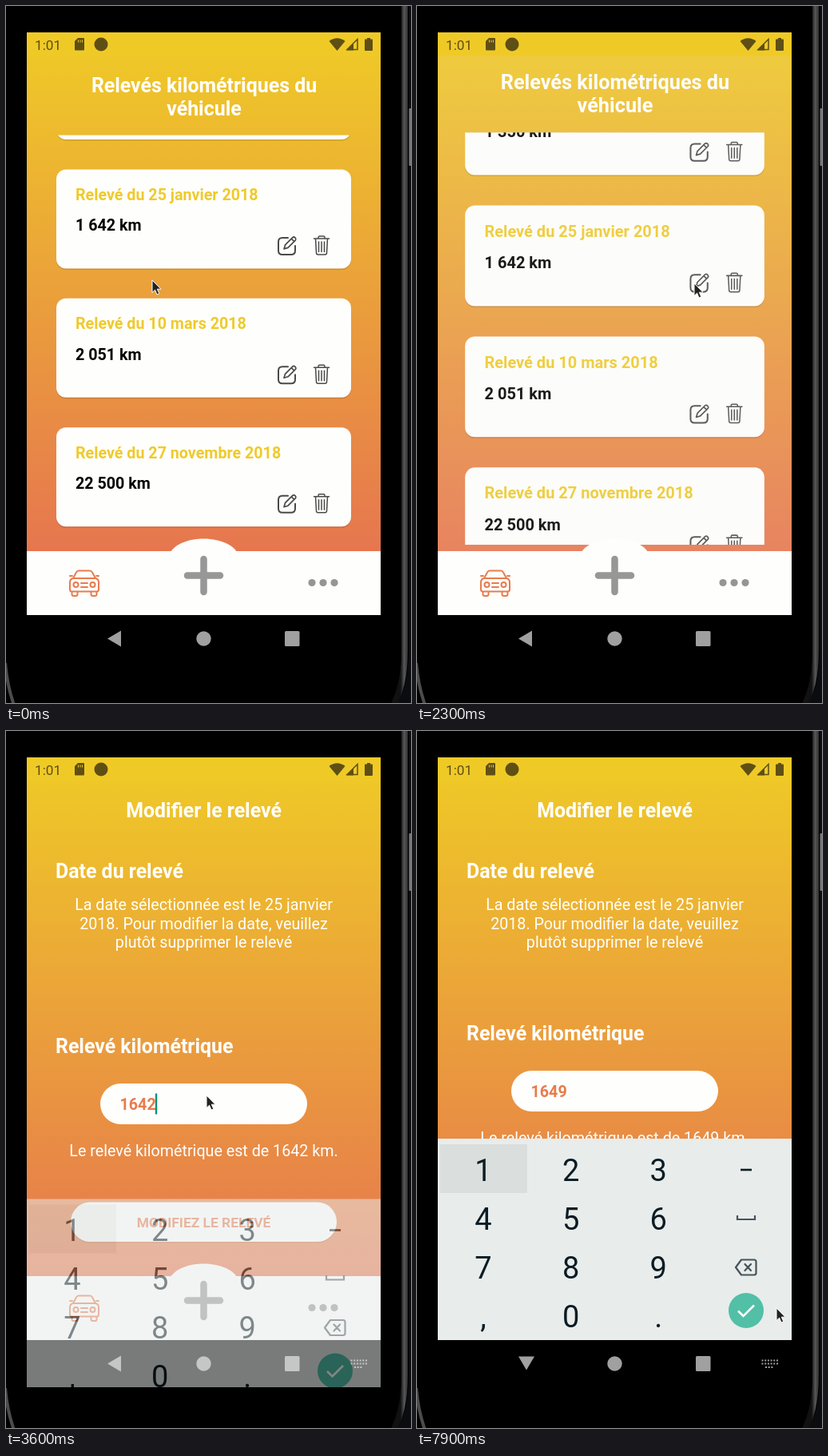
Recreate the animation shown at these times as an HTML page. Size 507x872 px, loop 8000 ms.

```html
<!DOCTYPE html>
<html lang="fr">
<head>
<meta charset="utf-8">
<title>Relevés kilométriques</title>
<style>
  html, body { margin: 0; width: 100%; height: 100%; overflow: hidden; background: #000; }
  svg { display: block; width: 100%; height: 100%; }
  text { font-family: Roboto, "Open Sans", sans-serif; font-size: 19.7px; }
  .h { font-size: 24.9px; font-weight: 700; fill: #fff; }
  .b { font-weight: 700; }
  .mid { text-anchor: middle; }
  .key { font-size: 38px; fill: #0b1c24; text-anchor: middle; }
  .line { fill: none; stroke-linecap: round; stroke-linejoin: round; }
</style>
</head>
<body>
<svg viewBox="0 0 507 872" xmlns="http://www.w3.org/2000/svg">
  <defs>
    <linearGradient id="sky" gradientUnits="userSpaceOnUse" x1="0" y1="33" x2="0" y2="682">
      <stop offset="0" stop-color="#efcb26"/>
      <stop offset="1" stop-color="#e6764f"/>
    </linearGradient>
    <linearGradient id="metal" gradientUnits="userSpaceOnUse" x1="494" y1="0" x2="504" y2="0">
      <stop offset="0" stop-color="#111"/>
      <stop offset=".45" stop-color="#565656"/>
      <stop offset="1" stop-color="#2a2a2a"/>
    </linearGradient>
    <clipPath id="appClip"><rect x="26" y="62" width="443" height="620"/></clipPath>
    <clipPath id="listClip"><rect x="50" y="161.5" width="395" height="508"/></clipPath>
    <clipPath id="screenClip"><rect x="26" y="33" width="443" height="788"/></clipPath>
    <g id="edit" class="line" stroke="#4a4a4a" stroke-width="2">
      <path d="M13 2H6Q1 2 1 7V18Q1 23 6 23H17Q22 23 22 18V12"/>
      <path d="M8 16L9.5 11 19 1.5Q20.5 .5 22 2 23.500 3.500 22.500 5L13 14.500ZM17.500 3.500L20.500 6.500" stroke-width="1.700"/>
    </g>
    <g id="trash" class="line" stroke="#4a4a4a" stroke-width="1.500">
      <path d="M.5 4H19.500M6 4V2.500Q6 1 7.500 1H12.500Q14 1 14 2.500V4M2.500 4L3.500 22Q3.600 24 5.500 24H14.500Q16.400 24 16.500 22L17.500 4"/>
      <path d="M6.500 8V20.500M10 8V20.500M13.500 8V20.500"/>
    </g>
  </defs>

  <!-- phone body -->
  <rect width="507" height="872"/>
  <path d="M499 -5V805C499 840 493 860 483 880" fill="none" stroke="url(#metal)" stroke-width="8"/>
  <path d="M507 0V872H490C500 855 504 835 504 805V0Z" fill="#0a0c10"/>
  <rect x="504.500" y="128" width="4" height="72" rx="1" fill="#777"/>
  <path d="M-1 822C1 846 5 862 12 880" fill="none" stroke="#4c4c4c" stroke-width="4"/>

  <!-- status bar -->
  <rect x="26" y="33" width="443" height="30" fill="#efca27"/>
  <g fill="#5f4f14">
    <text x="36" y="54.500" style="font-size:17.200px">1:01</text>
    <path d="M90 40H97Q98 40 98 41V54Q98 55.500 97 55.500H87Q86 55.500 86 54.500V44Z"/>
    <path d="M90.500 42.500V45.500M93 42.500V45.500M95.500 42.500V45.500" stroke="#efca27"/>
    <circle cx="119" cy="48" r="8.500"/>
    <path d="M404.500 44Q414.500 36.500 424.500 44L414.500 56Z"/>
    <path d="M427 54.500L440 41.500V54.500Z" fill="none" stroke="#5f4f14" stroke-width="1.500"/>
    <path d="M426 55.500L435 46.500V55.500Z"/>
    <path d="M449 42.500Q449 41.500 450 41.500H452V40H456V41.500H458Q459 41.500 459 42.500V55Q459 56 458 56H450Q449 56 449 55Z"/>
  </g>

  <!-- pages -->
  <g clip-path="url(#appClip)">
    <rect x="26" y="62" width="443" height="620" fill="#f2f2f2"/>
    <g id="listPage">
      <rect x="26" y="33" width="443" height="649" fill="url(#sky)"/>
      <text class="h mid" x="248" y="108">Relevés kilométriques du</text>
      <text class="h mid" x="248" y="137">véhicule</text>
      <g clip-path="url(#listClip)">
        <g id="cards"></g>
        <rect id="bar" x="427" width="5" height="320" fill="#555" opacity=".42"/>
      </g>
    </g>
    <g id="formPage">
      <rect x="26" y="33" width="443" height="649" fill="url(#sky)"/>
      <text class="h mid" x="247.500" y="108">Modifier le relevé</text>
      <text class="h" x="62" y="184">Date du relevé</text>
      <g class="mid" fill="#fff">
        <text x="247.500" y="224">La date sélectionnée est le 25 janvier</text>
        <text x="247.500" y="247.500">2018. Pour modifier la date, veuillez</text>
        <text x="247.500" y="271">plutôt supprimer le relevé</text>
      </g>
      <g id="field">
        <text class="h" x="62" y="403">Relevé kilométrique</text>
        <rect x="118" y="441" width="259" height="51" rx="25.500" fill="#fefefc"/>
        <text id="value" class="b" x="142.500" y="474" fill="#e77c4e"></text>
        <rect id="caret" y="453.500" width="2.400" height="26" fill="#0f8f77"/>
        <text id="label" class="mid" x="247.500" y="531.500" fill="#fff"></text>
        <rect x="81" y="591" width="333" height="49.500" rx="24.500" opacity=".12"/>
        <rect x="81" y="589.500" width="333" height="49.500" rx="24.500" fill="#fefefc"/>
        <text class="b mid" x="247.500" y="621" fill="#e77c4e" style="font-size:17.400px">MODIFIEZ LE RELEVÉ</text>
      </g>
    </g>
  </g>

  <!-- tab bar -->
  <g fill="#fefefc">
    <rect x="26" y="682" width="443" height="80"/>
    <path d="M206 683C220 661 275 661 289 683Z"/>
  </g>
  <path class="line" d="M227 712.500H268M247.500 692V733" stroke="#979797" stroke-width="8.500"/>
  <g fill="#959595">
    <circle cx="383" cy="721.500" r="4.600"/>
    <circle cx="397" cy="721.500" r="4.600"/>
    <circle cx="411" cy="721.500" r="4.600"/>
  </g>
  <g class="line" stroke="#e77c4e" stroke-width="2">
    <path d="M84 716L88 708.500Q89 706.500 91 706.500H105Q107 706.500 108 708.500L112 716"/>
    <path d="M84 716H112Q116 717 116 721V730Q116 732.500 113.500 732.500H82.500Q80 732.500 80 730V721Q80 717 84 716ZM80 713H83M113 713H116"/>
    <path d="M82.500 733V736Q82.500 738 84.500 738H87.500Q89.500 738 89.500 736V733M106.500 733V736Q106.500 738 108.500 738H111.500Q113.500 738 113.500 736V733M94 722H102M94 727H102"/>
    <circle cx="87.500" cy="724" r="3"/>
    <circle cx="108.500" cy="724" r="3"/>
  </g>

  <!-- system navigation -->
  <g fill="#a0a0a0">
    <path id="back"/>
    <circle cx="247.500" cy="791.500" r="9.200"/>
    <rect x="349" y="782" width="18.500" height="19" rx="1.500"/>
    <path id="kbIcon" d="M431.500 787.500H452M431.500 791.500H452M436 796H447" stroke="#a0a0a0" stroke-width="2" stroke-dasharray="2 1.700"/>
  </g>

  <!-- keyboard -->
  <g clip-path="url(#screenClip)">
    <g id="keyboard">
      <rect x="26" y="510" width="443" height="252" fill="#e8eceb"/>
      <rect x="28.500" y="517" width="109.500" height="61" fill="#dadedd"/>
      <g id="keys"></g>
      <g class="line" stroke="#45545a" stroke-width="2.200">
        <path d="M405 549H419" stroke="#0b1c24" stroke-linecap="butt" stroke-width="2.600"/>
        <path d="M401 606V611H423V606" stroke-linecap="butt" stroke-linejoin="miter"/>
        <path d="M406 661.500H422Q424.500 661.500 424.500 664V678Q424.500 680.500 422 680.500H406L399 671ZM410.500 667L418 675M418 667L410.500 675"/>
      </g>
      <circle cx="412" cy="725" r="22" fill="#52bfa7"/>
      <path d="M402 725.500L408.500 732 422 718.500" fill="none" stroke="#fff" stroke-width="2.600"/>
    </g>
  </g>

  <path id="cursor" d="M0 0V15.500L3.600 12.200 6 18 8.800 16.800 6.300 11.200H11Z" fill="#222" stroke="#fff" stroke-width="1" stroke-linejoin="round"/>
</svg>
<script>
const LOOP = 8000, STEP = 100, DIGIT = 11.33;
const $ = id => document.getElementById(id);
const set = (id, attrs) => {
  for (const k in attrs) $(id).setAttribute(k, attrs[k]);
};
const clamp = x => Math.max(0, Math.min(1, x));

// Linear track through rows of [time, ...values]
function track(rows, t) {
  if (t <= rows[0][0]) return rows[0].slice(1);
  for (let i = 1; i < rows.length; i++) {
    const a = rows[i - 1], b = rows[i];
    if (t <= b[0]) {
      const u = (t - a[0]) / (b[0] - a[0]);
      return a.slice(1).map((v, j) => v + (b[j + 1] - v) * u);
    }
  }
  return rows[rows.length - 1].slice(1);
}

const cursorPath = [
  [200, 183, 343], [400, 237, 305], [500, 237, 305], [600, 242, 308], [800, 253, 325],
  [1100, 252, 343], [1200, 252, 343], [1300, 249, 350], [1400, 294, 350], [1500, 294, 350],
  [1600, 410, 358], [1700, 410, 358], [1800, 332, 350], [1900, 347, 347], [2800, 347, 347],
  [3300, 251, 456], [7700, 251, 456], [7800, 352, 620], [7900, 450, 722]
];
const scrollPath = [[500, 0], [600, 4], [800, 20], [1100, 40], [1200, 40], [1300, 47]];
const barFade = [[500, 0], [600, .42], [1700, .42], [1800, .2], [1900, 0]];
const pageTurn = [[2200, 0], [2300, .15], [2400, .5], [2500, .82], [2600, .96], [2700, 1]];
const keyboardPath = [[3500, 120, 0], [3600, 75.5, .52], [3700, 22, .9], [3800, 0, 1]];

const readings = [
  ["", "1 350 km"],
  ["Relevé du 25 janvier 2018", "1 642 km"],
  ["Relevé du 10 mars 2018", "2 051 km"],
  ["Relevé du 27 novembre 2018", "22 500 km"]
];
$("cards").innerHTML = readings.map(([date, km], i) => `
  <g transform="translate(63 ${43 + 161.4 * i})">
    <rect y="1.5" width="369" height="124" rx="12" opacity=".14"/>
    <rect width="369" height="124" rx="12" fill="#fefefc"/>
    <text class="b" x="24" y="38.500" fill="#efca2b">${date}</text>
    <text class="b" x="24" y="77">${km}</text>
    <use href="#edit" x="277" y="83.500"/>
    <use href="#trash" x="322" y="82.500"/>
  </g>`).join("");

$("keys").innerHTML = [..."123456789,0."].map((c, i) =>
  `<text class="key" x="${83 + 109.6 * (i % 3)}" y="${562.5 + 61 * Math.floor(i / 3)}">${c}</text>`).join("");

const typed = t => t < 5900 ? "1642" : t < 6900 ? "164" : "1649";
const caretOn = t => t >= 3600 && !(t >= 4500 && t < 5000 || t >= 5500 && t < 5900 ||
  t >= 6400 && t < 6900 || t >= 7500);
const zoom = s => `translate(247.5 372) scale(${s}) translate(-247.5 -372)`;

function draw(time) {
  const t = Math.floor(time % LOOP / STEP) * STEP;

  const [scroll] = track(scrollPath, t);
  set("cards", { transform: `translate(0 ${scroll})` });
  set("bar", { y: 349.6 - .63 * scroll, opacity: track(barFade, t)[0] });

  const [turn] = track(pageTurn, t);
  set("listPage", { transform: zoom(1 + .103 * turn), opacity: 1 - .76 * turn });
  set("formPage", { transform: zoom(.9 + .1 * turn), opacity: clamp(turn * 2 - 1) });

  const text = typed(t);
  $("value").textContent = text;
  $("label").textContent = `Le relevé kilométrique est de ${typed(t - STEP)} km.`;
  set("caret", { x: 141.5 + DIGIT * text.length, opacity: caretOn(t) ? 1 : 0 });
  set("field", { transform: `translate(0 ${t < 3700 ? 0 : -16})` });

  const [drop, alpha] = track(keyboardPath, t);
  set("keyboard", { transform: `translate(0 ${drop})`, opacity: alpha });
  set("kbIcon", { opacity: t < 3600 ? 0 : 1 });
  set("back", { d: t < 3700 ? "M127 791.500L144 781.500V801.500Z" : "M127 782.500H147L137 799.500Z" });

  const [x, y] = track(cursorPath, t);
  set("cursor", { transform: `translate(${x} ${y})` });
}

const start = performance.now();
(function tick() {
  draw(performance.now() - start);
  requestAnimationFrame(tick);
})();
</script>
</body>
</html>
```
